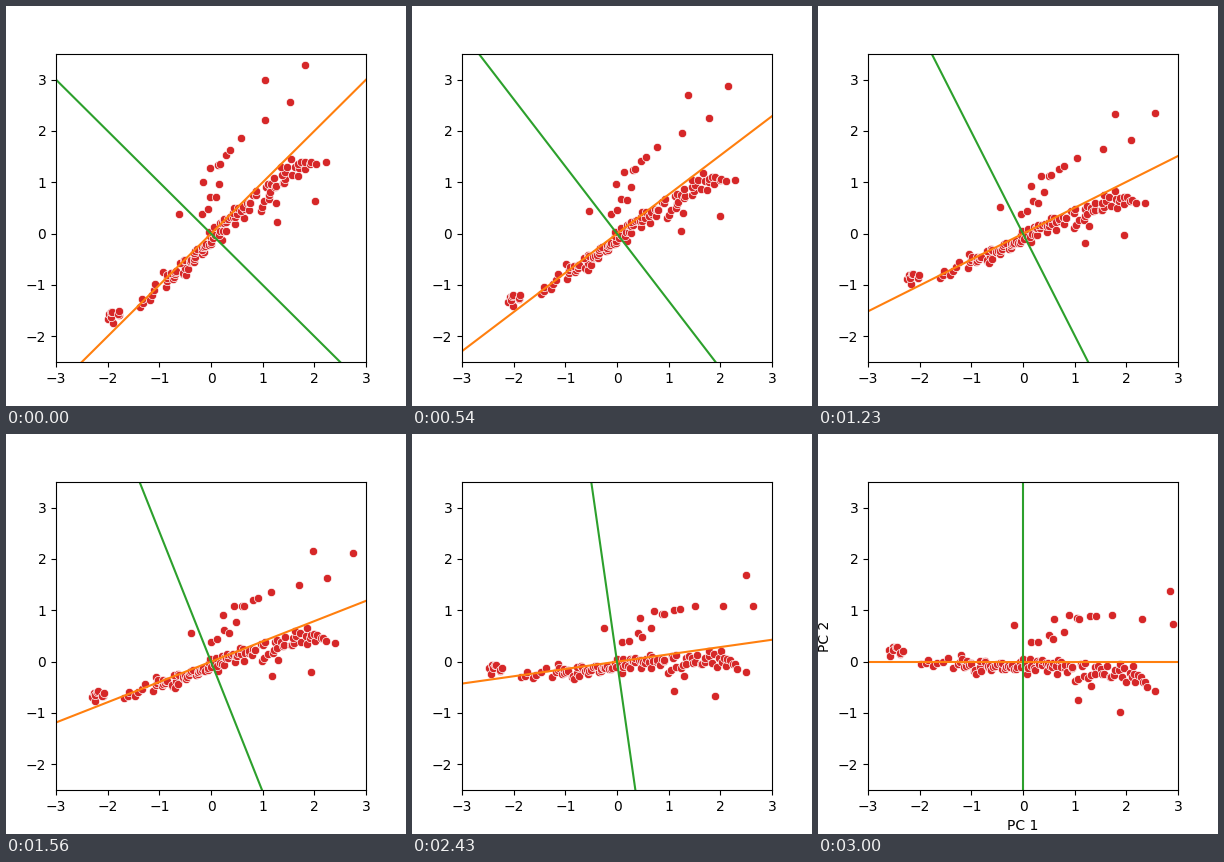
Recreate the animation shown at these times as a matplotlib script. Size 400x400 px, loop 6030 ms.

```python
import matplotlib.pyplot as plt
import numpy as np
from matplotlib.animation import FuncAnimation

STEPS, HOLD = 100, 101
INTERVAL = 30

rng = np.random.default_rng(4)


def strip(count, start, end, height, spread):
    """Points spread evenly along PC 1, scattered around a height on PC 2."""
    x = np.linspace(start, end, count)
    x += rng.normal(0, 0.4 * (end - start) / count, count)
    y = height + spread * np.clip(rng.normal(size=count), -1.8, 1.8)
    return np.column_stack([x, y])


far_points = [(3.61, 1.03), (2.85, 1.38), (2.90, 0.74), (2.30, 0.83),
              (1.72, 0.91), (-0.17, 0.71), (2.56, -0.58), (1.87, -0.98),
              (1.07, -0.75)]
rise = 0.25 + 0.7 * np.sin(np.linspace(0, np.pi / 2, 11))
scores = np.vstack([
    far_points,
    strip(11, 0.18, 1.40, rise, 0.09),
    strip(9, -2.60, -2.32, 0.22, 0.07),
    strip(9, -2.00, -1.26, 0.00, 0.09),
    strip(68, -1.25, 0.95, -0.09, 0.08),
    strip(36, 0.97, 2.40, np.linspace(-0.18, -0.36, 36), 0.14),
])

h = np.sqrt(0.5)
to_components = np.array([[h, h], [-h, h]])
data = scores @ to_components
axis_1 = np.array([(-10, -10), (10, 10)])
axis_2 = np.array([(-10, 10), (10, -10)])

fig, ax = plt.subplots(figsize=(4, 4), dpi=100)
ax.set(xlim=(-3, 3), ylim=(-2.5, 3.5))
dots = ax.scatter(*data.T, s=36, color="tab:red",
                  edgecolors="white", linewidths=0.48)
line_1, = ax.plot(*axis_1.T, color="tab:orange")
line_2, = ax.plot(*axis_2.T, color="tab:green")
labels = [ax.set_xlabel("PC 1"), ax.set_ylabel("PC 2")]


def update(frame):
    t = min(frame / STEPS, 1)
    # Blend linearly from the identity to the component basis.
    blend = (1 - t) * np.eye(2) + t * to_components
    dots.set_offsets(data @ blend.T)
    line_1.set_data(*(axis_1 @ blend.T).T)
    line_2.set_data(*(axis_2 @ blend.T).T)
    for label in labels:
        label.set_visible(t == 1)
    return [dots, line_1, line_2, *labels]


anim = FuncAnimation(fig, update, frames=STEPS + HOLD, interval=INTERVAL,
                     repeat=True, repeat_delay=0)
plt.show()
```
